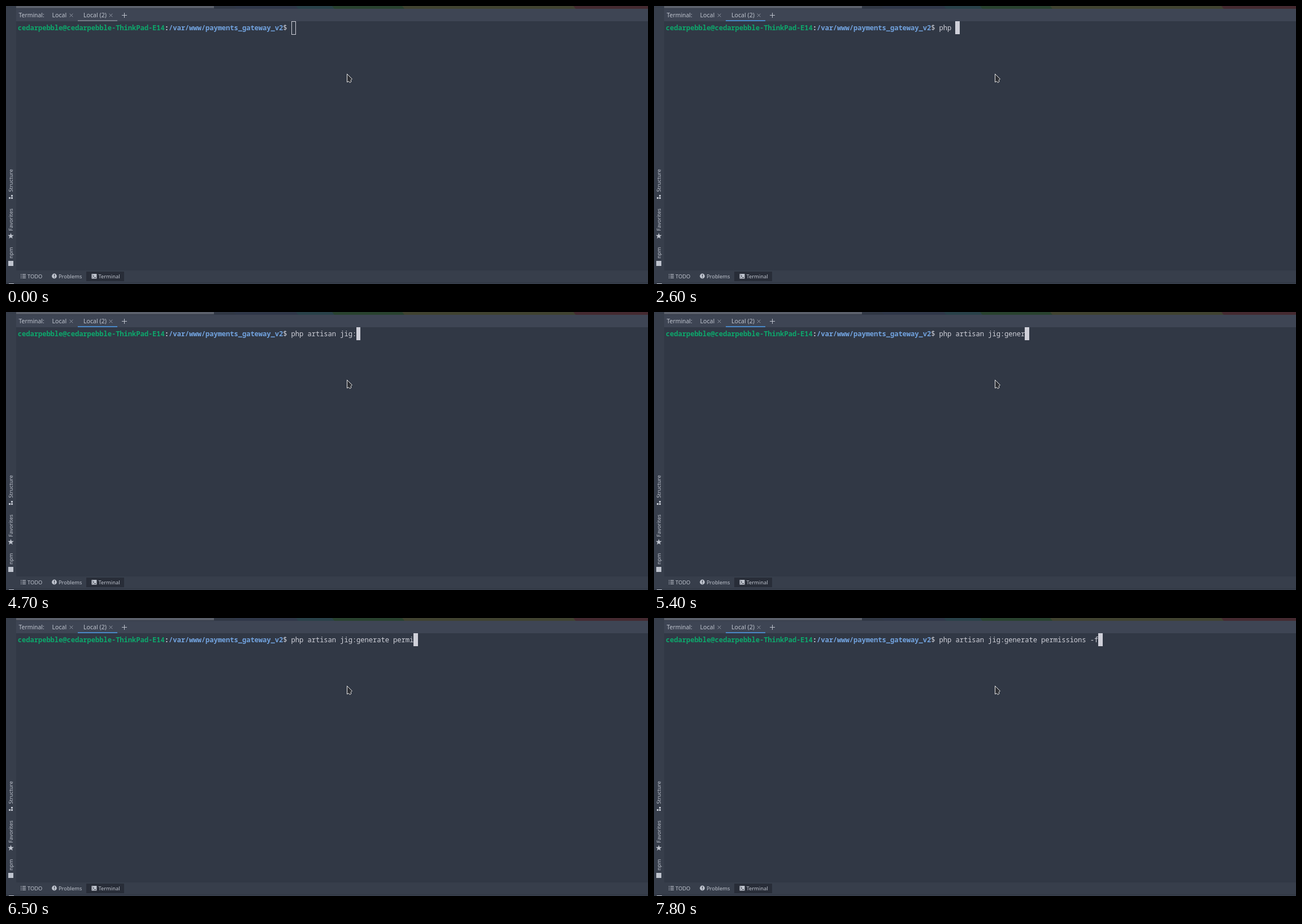
Recreate the animation shown at these times as an HTML page with a canvas. Size 1136 px wide and 493 px high, loop 8 s.

```html
<!DOCTYPE html>
<html lang="en">
<head>
<meta charset="utf-8">
<title>Terminal</title>
<style>
  html, body { margin: 0; width: 100%; height: 100%; overflow: hidden; background: #313845; }
  canvas { display: block; }
</style>
</head>
<body>
<canvas id="stage"></canvas>
<script>
const stage = document.getElementById('stage');
const W = stage.width = 1136, H = stage.height = 493;
const ctx = stage.getContext('2d', { alpha: false });
const LOOP = 8000, FOCUS_AT = 1500, TYPE_AT = 2100, KEY_MS = 100;
const CELL = 7.22, LEFT = 21.26;
const SIDE = 18, HEADER_END = 27, FOOTER = 469;
const INK = '#bfc4ce', BRIGHT = '#cfd0d9', PANEL = '#373e4b', DARK = '#282d38', BACK = '#313845';
const PROMPT = [
  ['cedarpebble@cedarpebble-ThinkPad-E14', '#0da86c', 'bold'],
  [':', BRIGHT, 'bold'],
  ['/var/www/payments_gateway_v2', '#72a3df', 'bold'],
  ['$ ', BRIGHT, 'normal']
];
// One key per step; "~" is a step of hesitation
const KEYS = 'p~h~p ~~~ar~tisan ~~ji~g~~:~g~enerate ~perm~i~ssio~ns -~~f';

function rect(x, y, w, h, color) {
  ctx.fillStyle = color;
  ctx.fillRect(x, y, w, h);
}

function path(points, { fill, stroke }) {
  ctx.beginPath();
  for (const [x, y] of points) ctx.lineTo(x, y);
  if (fill) { ctx.closePath(); ctx.fillStyle = fill; ctx.fill(); }
  if (stroke) { ctx.strokeStyle = stroke; ctx.stroke(); }
}

function label(text, x, y, size = 9.3) {
  ctx.font = `${size}px "Noto Sans", "Open Sans", sans-serif`;
  ctx.textAlign = 'left';
  ctx.fillStyle = INK;
  ctx.fillText(text, x, y);
}

function sideLabel(text, y) {
  ctx.save();
  ctx.translate(11.5, y);
  ctx.rotate(-Math.PI / 2);
  label(text, 0, 0);
  ctx.restore();
}

// Two crossing strokes of half-length r, turned by the given angle
function cross(cx, cy, r, angle, color) {
  for (const a of [angle, angle + Math.PI / 2]) {
    const dx = r * Math.cos(a), dy = r * Math.sin(a);
    path([[cx - dx, cy - dy], [cx + dx, cy + dy]], { stroke: color });
  }
}

function star(cx, cy, r) {
  const points = Array.from({ length: 10 }, (_, i) => {
    const a = (i / 5 - 0.5) * Math.PI, d = i % 2 ? r * 0.42 : r;
    return [cx + d * Math.cos(a), cy + d * Math.sin(a)];
  });
  path(points, { fill: INK });
}

// Writes text on the character grid and returns the next column
function write(text, col, color, weight) {
  ctx.font = `${weight} 12.2px "Noto Sans Mono", monospace`;
  ctx.textAlign = 'center';
  ctx.fillStyle = color;
  for (const ch of text) ctx.fillText(ch, LEFT + (col++ + 0.45) * CELL, 42.5);
  return col;
}

function drawEditorEdge() {
  const bands = { 403: '#303849', 513: '#294149', 577: '#29422f', 701: '#414331', 1004: '#452a31' };
  for (const [x, color] of Object.entries(bands)) {
    path([[+x, 0], [W, 0], [W, 5], [+x + 4, 5]], { fill: color });
  }
  rect(SIDE, 0, 350, 4, '#5b606b');
}

function drawTabs(focused) {
  rect(SIDE, 5, W, HEADER_END - 5, '#3e4554');
  label('Terminal:', 22.5, 20, 10.4);
  label('Local', 81.5, 20, 10.6);
  label('Local (2)', 137, 20, 10.6);
  for (const x of [115.5, 185.5]) cross(x, 16.5, 4, Math.PI / 4, '#9298a5');
  cross(209.5, 16.5, 4.5, 0, INK);
  rect(127, HEADER_END - 2, 70, 2, focused ? '#4a88c7' : '#747a86');
}

function drawSideBar() {
  rect(0, 0, SIDE, H, PANEL);
  sideLabel('Structure', 329.8);
  sideLabel('Favorites', 398.8);
  sideLabel('npm', 447.8);
  for (const [x, y] of [[5, 339], [9, 339], [9, 335]]) rect(x, y, 3, 3, INK);
  star(8.5, 408, 5.5);
  rect(4, 452, 9, 9, INK);
}

function drawFooter() {
  rect(SIDE, FOOTER, W, H - FOOTER, PANEL);
  rect(142, FOOTER + 2, 67, 17, DARK);
  for (let y = 475.5; y < 483; y += 3) {
    rect(26, y, 1.5, 1.2, INK);
    rect(29, y, 6, 1.2, INK);
  }
  ctx.beginPath();
  ctx.arc(85.5, 479, 4.4, 0, Math.PI * 2);
  ctx.fillStyle = INK;
  ctx.fill();
  rect(85, 476, 1.2, 4, PANEL);
  rect(85, 481, 1.2, 1.2, PANEL);
  rect(151.5, 475, 9, 8.5, INK);
  path([[153, 476.5], [155.5, 479], [153, 481.5]], { stroke: DARK });
  rect(156, 481, 3, 1, DARK);
  label('TODO', 38, 483);
  label('Problems', 93, 483);
  label('Terminal', 163.5, 483);
  rect(0, 490, W, 1, '#303642');
  rect(5, 492, 9, 1, INK);
}

function drawCursor(col, focused) {
  const x = LEFT + col * CELL, left = Math.floor(x), right = Math.floor(x + 7.45);
  if (focused) return rect(left, 27, right - left, 23, BRIGHT);
  ctx.strokeStyle = BRIGHT;
  ctx.strokeRect(left + 0.5, 27.5, 7, 23);
}

function drawTerminal(time, focused) {
  const steps = Math.max(0, Math.floor((time - TYPE_AT) / KEY_MS) + 1);
  const typed = KEYS.slice(0, steps).replaceAll('~', '');
  let col = 0;
  for (const run of [...PROMPT, [typed, BRIGHT, 'normal']]) {
    const [text, color, weight] = run;
    col = write(text, col, color, weight);
  }
  drawCursor(col, focused);
}

function drawPointer(x, y) {
  const outline = [[0, 0], [9, 9], [6.5, 11], [7.5, 13.5], [5, 15.5], [3, 13], [0, 14.5], [0, 0]];
  path(outline.map(([dx, dy]) => [x + dx, y + dy]), { fill: '#2f3136', stroke: '#e6e6e6' });
}

function draw(time) {
  const focused = time >= FOCUS_AT;
  rect(0, 0, W, H, BACK);
  drawEditorEdge();
  drawTabs(focused);
  drawSideBar();
  drawFooter();
  drawTerminal(time, focused);
  drawPointer(603.5, 120.5);
}

const start = performance.now();
function tick() {
  draw((performance.now() - start) % LOOP);
  requestAnimationFrame(tick);
}
tick();
</script>
</body>
</html>
```
